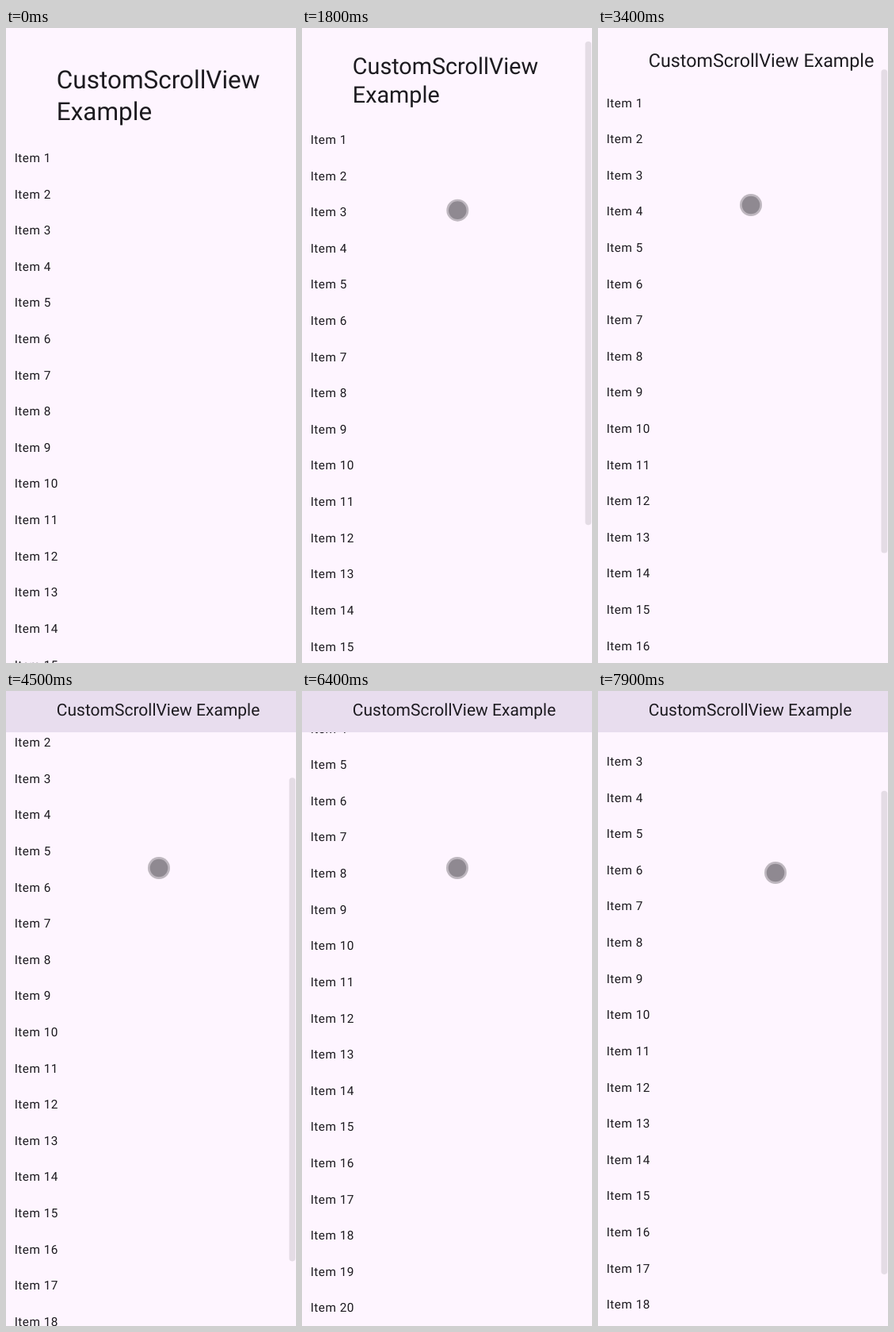
Recreate the animation shown at these times as an HTML page. Size 366 by 800 pixels, loop 8 s.

```html
<!DOCTYPE html>
<html lang="en">
<head>
<meta charset="utf-8">
<title>CustomScrollView Example</title>
<style>
  html, body { margin: 0; width: 100%; height: 100%; overflow: hidden; background: #fef5ff; }
  svg { display: block; width: 366px; height: 800px; }
  text { font-family: Roboto, sans-serif; fill: #1d1b20; text-rendering: geometricPrecision; white-space: pre; }
  #items { font-size: 15.4px; letter-spacing: .46px; }
</style>
</head>
<body>
<svg viewBox="0 0 366 800">
  <g id="items"></g>
  <rect id="header" width="366"/>
  <text id="line1" x="63.8"></text>
  <text id="line2" x="63.8"></text>
  <rect id="bar" x="357.4" width="7.8" height="609.2" rx="3.6" fill="#000"/>
  <g id="cursor">
    <circle r="14" fill="#000" fill-opacity=".25"/>
    <circle r="11.3" fill="#8f8991"/>
  </g>
</svg>
<script>
const LOOP = 8000, TICK = 100;
const HEIGHT = 800, EXPANDED = 141, COLLAPSED = 52, RANGE = EXPANDED - COLLAPSED;
const ROW = 45.61, COUNT = 20, FONT = 21, WRAP_SCALE = 1.175;
const CONTENT = EXPANDED + ROW * COUNT, MAX_SCROLL = CONTENT - HEIGHT;
const BAR_IDLE = 9, BAR_FADE = 3;

// Scroll strokes: first tick, ticks, distance.
const strokes = [
  [14, 1, 6], [18, 1, 17], [23, 1, 11], [27, 4, 25.5], [34, 1, 10], [36, 2, 30.5],
  [41, 2, 16.5], [45, 1, 28], [47, 5, 46.7], [55, 1, 62],
  [66, 4, -48], [73, 2, -15.5], [78, 2, -23.5]
];

const [items, header, line1, line2, bar, cursor] =
  ['items', 'header', 'line1', 'line2', 'bar', 'cursor'].map(id => document.getElementById(id));

function set(el, attrs) {
  for (const key in attrs) el.setAttribute(key, attrs[key]);
}

for (let i = 0; i < COUNT; i++) {
  const row = document.createElementNS('http://www.w3.org/2000/svg', 'text');
  set(row, { x: 10.7, y: EXPANDED + ROW * (i + 0.5) + 5.2 });
  row.textContent = `Item ${i + 1}`;
  items.append(row);
}

const clamp = v => Math.max(0, Math.min(1, v));
const ramp = (tick, start, ticks) => clamp((tick - start + 1) / ticks);

// Forward and backward travel, and the opacity of the scroll bar.
function scrollAt(tick) {
  let down = 0, back = 0, wake = -Infinity, last = -Infinity;
  for (const [start, ticks, distance] of strokes) {
    if (tick < start) break;
    const moved = distance * ramp(tick, start, ticks);
    if (moved > 0) down += moved; else back -= moved;
    if (start - last > BAR_IDLE) wake = start;
    last = Math.min(tick, start + ticks - 1);
  }
  const awake = tick - last < BAR_IDLE;
  return { down: Math.min(down, MAX_SCROLL), back, shade: awake ? 0.1 * ramp(tick, wake, BAR_FADE) : 0 };
}

// The pointer enters, settles, then drifts along with the scrolling.
function cursorAt(tick, down, back) {
  const enter = ramp(tick, 3, 4), settle = ramp(tick, 8, 4);
  const drift = clamp(down / 69), late = clamp((down - 145) / 108), turn = clamp(back / 63);
  return [
    256 - 50 * enter - 8 * settle - 5 * drift + 3 * late + 28 * turn,
    277 - 10 * enter - 34 * settle - 10 * drift + 6 * turn
  ];
}

function draw(tick) {
  const { down, back, shade } = scrollAt(tick);
  const scroll = down - back;
  const fold = clamp(scroll / RANGE);
  const bottom = EXPANDED - RANGE * fold;
  const scale = 1.5 - 0.5 * fold;
  const size = FONT * scale;
  const base = bottom - 15.3 - 0.2945 * size;
  const wrapped = scale > WRAP_SCALE;

  set(items, { transform: `translate(0 ${-scroll})` });
  set(header, { height: bottom, fill: fold < 1 ? '#fef5ff' : '#e8ddee' });
  set(line1, { y: wrapped ? base - 1.273 * size : base, 'font-size': size });
  set(line2, { y: base, 'font-size': size });
  line1.textContent = wrapped ? 'CustomScrollView' : 'CustomScrollView Example';
  line2.textContent = wrapped ? 'Example' : '';
  set(bar, { y: scroll * HEIGHT / CONTENT - 0.5, 'fill-opacity': shade });
  set(cursor, {
    transform: `translate(${cursorAt(tick, down, back)})`,
    visibility: tick < 2 ? 'hidden' : 'visible'
  });
}

let shown = -1;
function frame() {
  const tick = Math.floor(performance.now() % LOOP / TICK);
  if (tick !== shown) draw(shown = tick);
  requestAnimationFrame(frame);
}
frame();
</script>
</body>
</html>
```
